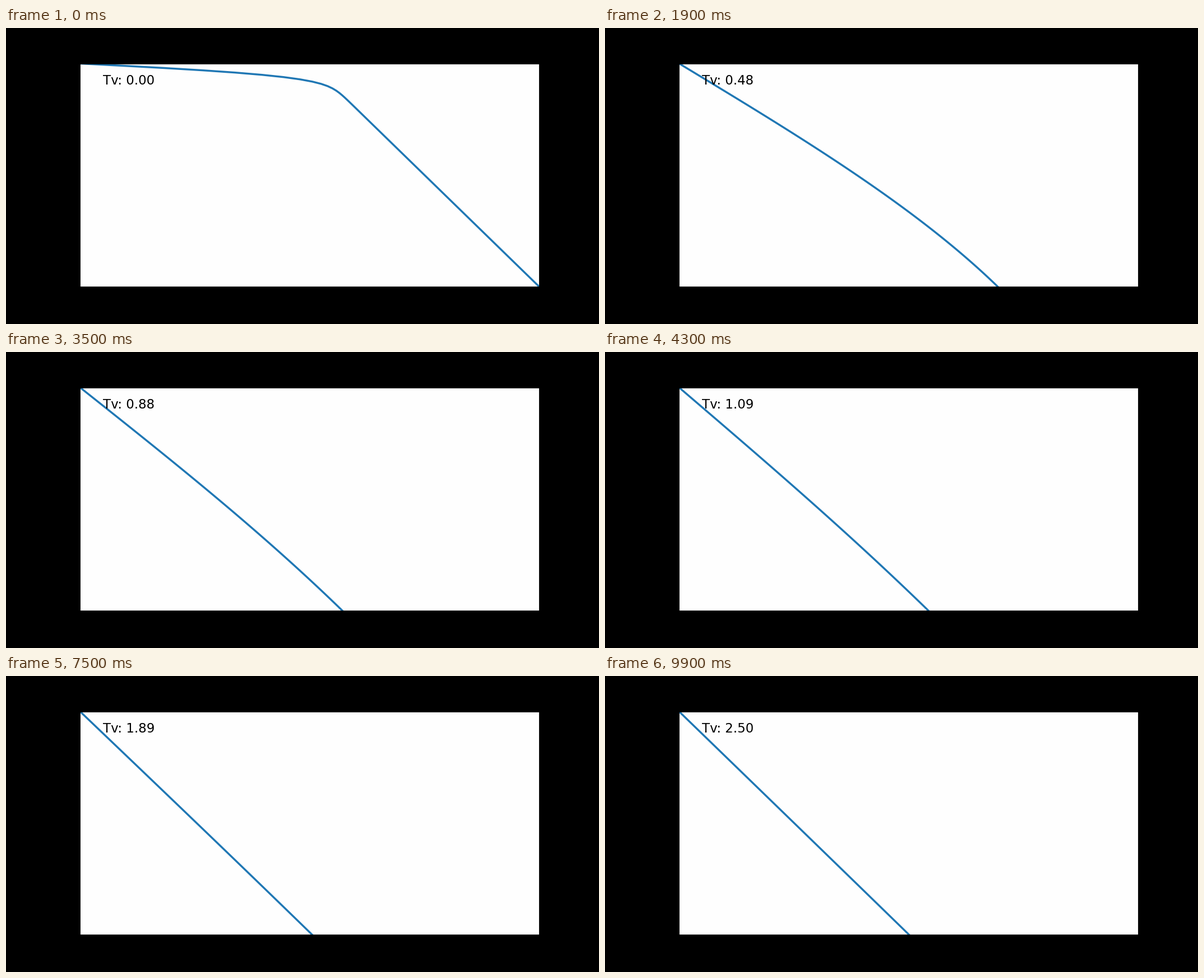
A matplotlib script that plays this animation: 1058x529 px, repeating every 10000 ms.

```python
import matplotlib.pyplot as plt
import numpy as np
from matplotlib.animation import FuncAnimation

W, H = 1058, 529
FRAMES = 100
DPI = 165  # 10 pt text and 1.5 pt lines at this density

times = np.linspace(0.001, 2.5, FRAMES)
depth = np.linspace(0, 1, 100)
modes = np.pi / 2 * (2 * np.arange(100) + 1)
shapes = 2 / modes * np.sin(np.outer(depth, modes))


def pressure(tv):
    """Hydrostatic pressure plus the remaining excess (drained top, sealed base)."""
    return depth + shapes @ np.exp(-modes**2 * tv)


fig = plt.figure(figsize=(W / DPI, H / DPI), dpi=DPI, facecolor="black")
left, right, top, bottom = 132.25, 952.2, 63.5, 463.2
ax = fig.add_axes([left / W, 1 - bottom / H, (right - left) / W, (bottom - top) / H],
                  facecolor="#fefefe")
ax.set(xlim=(0, 2), ylim=(1, 0), xticks=[], yticks=[])

line, = ax.plot([], [], color="#1f77b4", lw=1.5)
label = ax.text(0.05, 0.95, "", transform=ax.transAxes, va="top", fontsize=10,
                family="DejaVu Sans", color="black")


def update(i):
    tv = times[i]
    line.set_data(pressure(tv), depth)
    label.set_text(f"Tv: {tv:.2f}")
    return line, label


anim = FuncAnimation(fig, update, frames=FRAMES, interval=100, repeat=True,
                     repeat_delay=0, blit=False)
plt.show()
```
